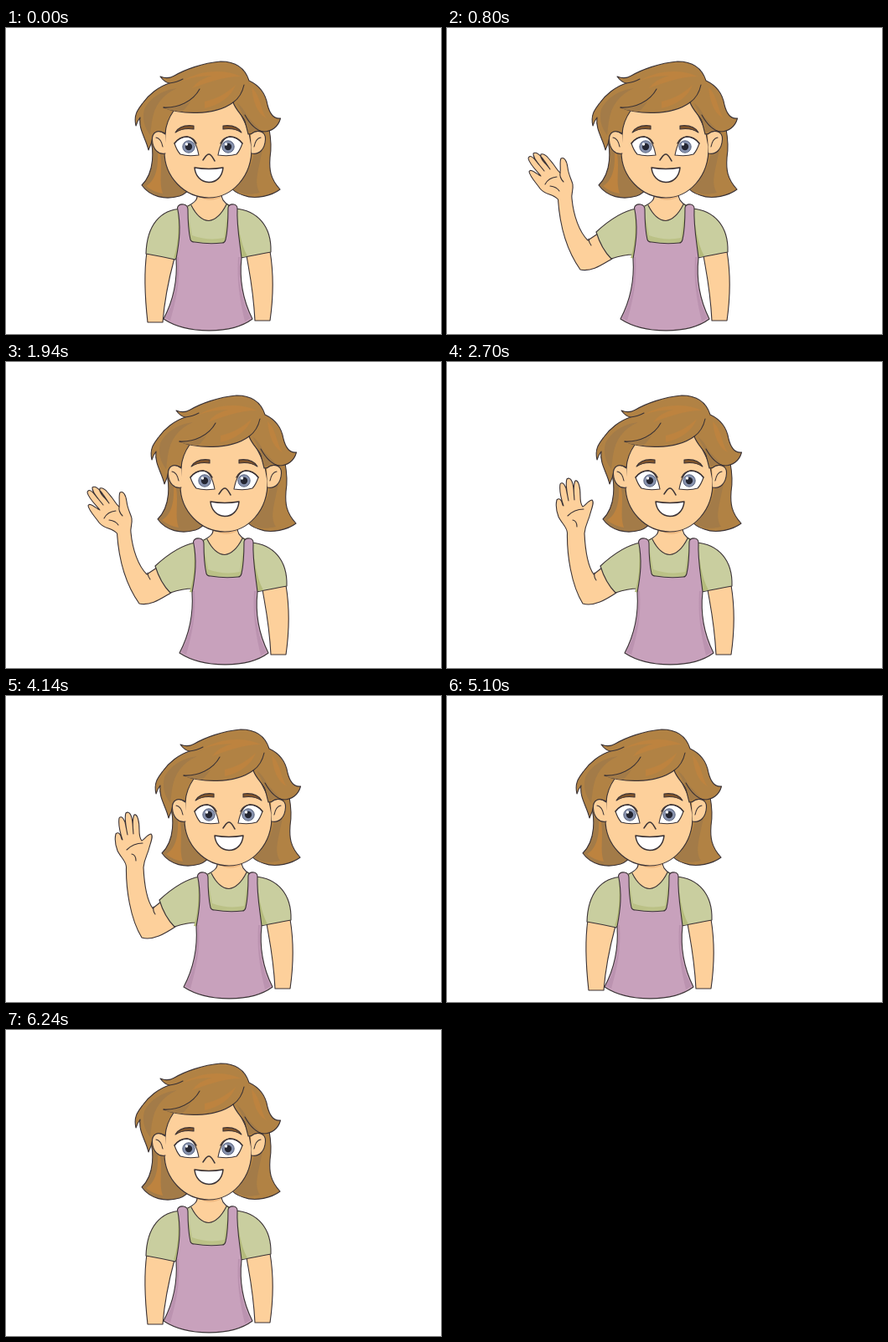
An HTML page that plays this animation: 519 by 366 pixels, repeating every 7000 ms.

```html
<!DOCTYPE html>
<html lang="en">
<head>
<meta charset="utf-8">
<title>Waving girl</title>
<style>
  html, body { margin: 0; width: 100%; height: 100%; overflow: hidden; background: #fff; }
  svg { display: block; width: 519px; height: 366px; }
  path { stroke-linecap: round; stroke-linejoin: round; }
  .ink, .line { stroke: #3a3235; stroke-width: 1.1; }
  .line { fill: none; }
  .bold { stroke-width: 1.5; }
  .skin { fill: #fdd09b; }
  .skin-shade { fill: #eeb981; }
  .hair { fill: #b18244; }
  .hair-dark { fill: #a37b48; }
  .hair-light { fill: #bd833f; }
  .shirt { fill: #c9ce9f; }
  .shirt-shade { fill: #b5bc7c; }
  .apron { fill: #c8a1bc; }
  .apron-shade { fill: #b78dab; }
  .white { fill: #fff; }

  /* Pose changes at 0.8 s, 2.7 s and 5.1 s of the 7 s loop */
  #girl { animation: shift 7s step-end infinite; }
  #rest { animation: rest 7s step-end infinite; }
  #tilted { animation: tilted 7s step-end infinite; }
  #upright { animation: upright 7s step-end infinite; }
  @keyframes shift {
    0%, 72.8571%, 100% { transform: translateX(0); }
    11.4286% { transform: translateX(19px); }
    38.5714% { transform: translateX(24px); }
  }
  @keyframes rest {
    0%, 72.8571%, 100% { visibility: visible; }
    11.4286% { visibility: hidden; }
  }
  @keyframes tilted {
    0%, 38.5714%, 100% { visibility: hidden; }
    11.4286% { visibility: visible; }
  }
  @keyframes upright {
    0%, 72.8571%, 100% { visibility: hidden; }
    38.5714% { visibility: visible; }
  }
</style>
</head>
<body>
<svg viewBox="0 0 519 366">
  <defs>
    <path id="sleeve" class="shirt ink" d="M207 216C190 219 173 231 159 244C163 257 169 268 177 276C186 273 195 271 204 271L214 240Z"/>
    <g id="eye">
      <path class="white ink" d="M201 138Q207 130 216 130Q226 131 230 152Q217 154 208 151Q204 147 201 138Z"/>
      <path class="line bold" d="M201 138Q207 130 216 130Q224 131 227 138"/>
      <circle cx="218" cy="142" r="7.2" fill="#8792ae" stroke="#5c6680"/>
      <circle cx="218" cy="142" r="4.2" fill="#242632"/>
    </g>
    <path id="brow" fill="#80542b" class="ink" d="M202 125Q208 115 224 117L224 121Q211 119 202 125Z"/>
  </defs>

  <g id="girl">
    <!-- back hair -->
    <path class="hair-dark ink" d="M172 130C176 145 178 172 162 188C172 202 190 206 207 201Q216 198 220 190L216 130Z"/>
    <path class="hair ink" d="M285 105L265 187Q272 197 283 200C298 206 318 200 327 193C315 180 314 169 315 155C317 143 316 132 314 121Z"/>
    <path class="hair-light" d="M181 150C182 172 176 184 167 189Q175 196 187 198C182 184 187 169 184 151Z"/>
    <path class="hair-dark" d="M296 150C294 166 283 184 268 191C280 200 291 200 303 197C295 185 302 168 306 145Z"/>

    <!-- arms -->
    <path class="skin ink" d="M287 272C289 286 295 310 297 350L315 350C319 322 320 297 315 267Z"/>
    <g id="rest">
      <path class="skin ink" d="M168 268C164 296 166 325 169 352L187 352C189 325 194 301 201 275Z"/>
      <path class="shirt ink" d="M210 216C184 217 168 236 167 270Q184 273 202 277L214 240Z"/>
    </g>
    <g id="tilted">
      <g transform="translate(-19 0)">
        <path class="skin ink" d="M180 246L168 254C158 244 151 225 149 204C148 198 151 194 150 187C149 182 145 176 144 167C143 159 140 154 136 156C134 160 136 168 135 173C132 171 130 167 127 163C122 157 117 149 112 151C110 156 118 162 123 169L117 160C113 154 107 147 103 150C102 156 110 163 116 171L107 160C103 154 98 151 97 156C98 162 106 170 112 177L110 176C104 172 99 168 98 172C99 178 107 186 111 192C117 200 126 198 132.500 205C134 228 140 262 159 289C173 292 185 283 197 276Z"/>
        <path class="line" d="M169 252Q169 256 172 260M117 187Q121 179 131 178M123 189Q131 190 134 195M135 173Q134 179 139 184"/>
      </g>
      <use href="#sleeve"/>
    </g>
    <g id="upright">
      <g transform="translate(-24 0)">
        <path class="skin ink" d="M185 246L175 254C168 244 165 226 164 205C165 194 169 190 171 181C173 174 176 167 173 165C168 166 165 172 162 173C160 171 159 166 159 160C159 150 157 141 153 142C151 146 151 155 152 165L151 152C150 142 147 137 143 140C141 145 143 156 145 166L143 156C142 148 138 142 135 146C134 152 136 163 139 172L138 171C137 165 134 162 131 165C130 169 130 177 133 185C136 192 144 198 143.500 205C143 230 148 266 162 289C175 293 190 284 202 276Z"/>
        <path class="line" d="M176 252Q175 257 178 261M144 184Q152 176 163 176M150 189Q155 190 155 197"/>
      </g>
      <use href="#sleeve"/>
    </g>

    <!-- shirt, neck and apron -->
    <path class="shirt ink" d="M273 216C300 218 317 237 316 268Q300 271 280 275L270 240Z"/>
    <path class="shirt" d="M212 214L223 210L264 210L275 215L276 274L206 275Z"/>
    <path class="shirt-shade" d="M208 219L212 238L206 276L200 275Q207 255 205 218ZM274 219C278 237 279 256 288 273L280 274L275 242Z"/>
    <path class="skin" d="M228 194C229 204 226 208 221 212Q230 230 242 230.500Q254 229 263 211C258 207 256 203 257 194Z"/>
    <path class="skin-shade" d="M229 197Q243 206 257 197L257 202Q243 210 229 201Z"/>
    <path class="line" d="M228 198C229 205 226 208 217 213M257 198C257 204 259 208 267 213M221 212Q230 230 242 230.500Q254 229 263 211"/>
    <path class="shirt-shade" d="M216 216L222 248Q241 255 260 251L265 216L264 257L220 256Z" opacity=".7"/>
    <path class="apron ink" d="M204.500 215Q206 210 212 211Q217 212 217 217C217 232 218 244 220 253Q221 256 225 256Q242 259 258 257Q261 257 262 253C265 240 265 230 265 215Q266 210 272 211Q276 212 276 216C275 237 279 256 281 275C278 302 284 328 294 348C270 366 217 367 188 348C198 329 205 306 203 276C207 254 209 237 204.500 215Z"/>
    <path class="apron-shade" d="M204.500 274C205 309 199 330 190 347L196 350C203 326 208 303 206 274ZM279.500 274C277 307 282 329 292 347L285 351C279 326 275 303 277 274Z" opacity=".7"/>

    <!-- face -->
    <path class="skin ink" d="M193 94L272 84C276 99 286 111 290 126L293 142C294 178 269 203 242 203C213 203 189 178 189 148L190 125Z"/>
    <use href="#eye"/>
    <use href="#eye" transform="matrix(-1 0 0 1 483 0)"/>
    <g class="white">
      <circle cx="215.500" cy="139" r="1.700"/>
      <circle cx="262.500" cy="139" r="1.700"/>
    </g>
    <use href="#brow"/>
    <use href="#brow" transform="matrix(-1 0 0 1 483 0)"/>
    <path class="line bold" d="M235 158C238 154 239 151 242 151S246 154 249 159"/>
    <path class="white ink bold" d="M225 167Q242 170 259 167C258 178 251 184.500 242 184.500C232 184 226 177 225 167Z"/>

    <!-- front hair -->
    <path class="hair ink" d="M188 95C206 103 248 106 271 89C274 98 281 103 285 111L289 127L296 126Q301 122 307 124C317 124 325 118 327.500 108C320 109 315 104 312 92C310 80 303 69 290 63C285 47 272 40 256 40C234 42 213 50 201 57C196 60 189 60 184 58Q189 65 195 66C182 70 170 80 163 90C157 98 152 104 155 117Q157 111 160 107C158 122 167 132 170 146Q174 138 175 130Q180 122 190 126Q191 112 200 99Z"/>
    <path class="hair-light" d="M211 63C231 51 259 48 280 58C259 58 238 66 222 72Q230 61 246 57Q227 57 211 63ZM237 88C252 85 266 76 274 68C269 82 255 92 237 96ZM293 71C304 81 304 99 311 108Q296 101 293 71Z"/>
    <path class="hair-dark" d="M165 97C174 80 190 74 204 72C186 80 177 93 174 112L172 128Q161 114 165 97ZM188 96Q209 95 220 88Q214 97 210 100Q197 99 188 96ZM275 89Q283 95 288 106L302 121L290 125Q286 108 275 89Z"/>
    <path class="line" d="M188 95C205 96 223 88 231 73M284 68Q281 82 271 89M195 66Q204 65 211 61M285 104Q295 122 307 124"/>

    <!-- ears -->
    <path class="skin ink" d="M190 127C181 120 174 125 174.500 134C175 145 182 152 190 150M292 127C300 120 310 124 309.500 133C309 145 302 152 293 150"/>
    <path class="line" d="M179 131Q185 132 187 142M304 131Q298 132 296 142"/>
  </g>
</svg>
</body>
</html>
```
